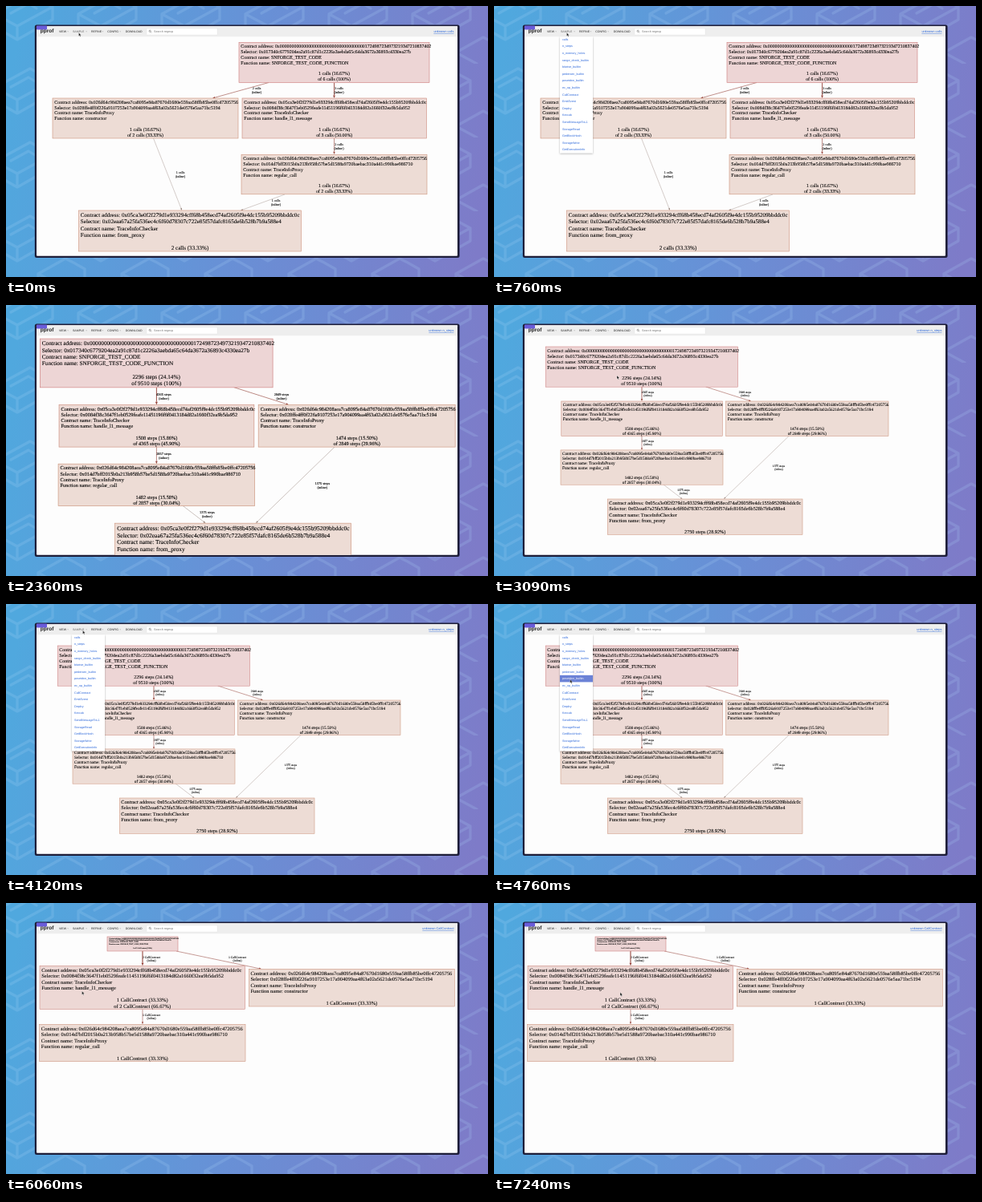
Animation of 600x338 px, one loop 7270 ms. Source, as an HTML page:

```html
<!DOCTYPE html>
<html lang="en">
<head>
<meta charset="utf-8">
<title>Call graph profile</title>
<style>
html, body { margin: 0; width: 100%; height: 100%; overflow: hidden; background: #6a8cd4; }
svg { display: block; width: 600px; height: 338px; text-rendering: geometricPrecision; }
text { white-space: pre; }
.graph { font-family: "Liberation Serif", "Times New Roman", serif; }
.graph text { stroke: #000; stroke-width: .08px; }
.ui { font-family: "Liberation Sans", Arial, sans-serif; font-size: 3.7px; fill: #212121; }
.link { fill: #2a66d9; }
</style>
</head>
<body>
<svg id="stage" viewBox="0 0 600 338">
  <defs>
    <linearGradient id="sky" gradientUnits="userSpaceOnUse" x1="0" y1="120" x2="600" y2="220">
      <stop offset="0" stop-color="#50a8de"/>
      <stop offset=".5" stop-color="#6890d6"/>
      <stop offset="1" stop-color="#7e7bc8"/>
    </linearGradient>
    <pattern id="bricks" width="104" height="92" patternUnits="userSpaceOnUse" patternTransform="translate(-22 -20)">
      <g fill="none" stroke="#b4d8fa" stroke-opacity=".18" stroke-width="3.2" stroke-linejoin="round" stroke-linecap="round">
        <path d="M8 30 L52 6 L80 21 V37 L36 62 L8 46Z M8 30 L36 45 L80 21 M36 45 V62 M28 29 L50 17 L60 23"/>
        <path d="M62 78 L96 59 L104 63 M0 63 L16 72 V88 M62 78 V92 M62 78 L88 92"/>
      </g>
    </pattern>
    <clipPath id="page"><rect x="38" y="38" width="524" height="273.7"/></clipPath>
    <filter id="soft" x="-20%" y="-20%" width="140%" height="140%">
      <feDropShadow dx="0" dy="1" stdDeviation="1" flood-opacity=".3"/>
    </filter>
  </defs>
  <rect width="600" height="338" fill="url(#sky)"/>
  <rect width="600" height="338" fill="url(#bricks)"/>
  <rect x="35.8" y="23.5" width="528.8" height="290.5" rx="2.5" fill="#1d1d38"/>
  <rect x="38" y="25.3" width="524" height="286.4" rx="1" fill="#fdfdfd"/>
  <g id="graphs" class="graph" clip-path="url(#page)"></g>
  <g id="bar" class="ui"><rect x="38" y="25.3" width="524" height="13" fill="#eee"/></g>
  <g id="menu" class="ui"></g>
  <path id="cursor" d="M0 0 V4.3 L1 3.4 L1.7 5 L2.5 4.6 L1.8 3.1 H3.1Z" fill="#111" stroke="#fff" stroke-width=".35"/>
</svg>
<script>
const LOOP = 7270;
const $ = id => document.getElementById(id);

function add(parent, tag, attrs, content) {
  const el = document.createElementNS('http://www.w3.org/2000/svg', tag);
  for (const k in attrs) el.setAttribute(k, attrs[k]);
  if (content) el.textContent = content;
  parent.appendChild(el);
  return el;
}

// Redder for a larger share of the total
function heat(share, sat, value) {
  const v = value * 255;
  return `rgb(${v | 0},${v * (1 - sat * share ** 0.3) | 0},${v * (1 - sat) | 0})`;
}

const CHECKER = ['0x05ca3e0f2f279d1e933294cff68b458ecd74af2605f9e4dc155b95209bbddc0c', 'TraceInfoChecker'];
const PROXY = ['0x026d64c984208aea7ca8095e84a87670d1680e559aa58ffb85be0ffc47205756', 'TraceInfoProxy'];
const TEST = ['0x' + '0'.repeat(36) + '1724987234973219347210837402', 'SNFORGE_TEST_CODE'];
const FUNCS = {
  test: [TEST, '0x017340c6779204ea2a91c87d1c2226a3aebda65c64da3672a36893c4330ea27b', 'SNFORGE_TEST_CODE_FUNCTION'],
  init: [PROXY, '0x028ffe4ff0f226a9107253e17a904099aa4f63a02a5621de0576e5aa71bc5194', 'constructor'],
  handle: [CHECKER, '0x0084f38c3647f1eb0529feafe11451196f6f0413184d82a1660f32ea9b5da952', 'handle_l1_message'],
  regular: [PROXY, '0x014d7bff2015b0a213b958b57be5d1588a9720baebac310a441c990bae986710', 'regular_call'],
  from: [CHECKER, '0x02eaa67a25fa536ec4c6f60d78307c722e85f57dafc8165de6b528b7b9a588e4', 'from_proxy']
};

// node: func, x, y, w, h, font size in points, share, totals
// edge: x1, y1, x2, y2, pen, label, label x, label y
const GRAPHS = [
  { unit: 'calls', scale: .295,
    nodes: [
      ['test', 290, 45.5, 237, 50, 20, 1, '1 calls (16.67%)', 'of 6 calls (100%)'],
      ['init', 58, 115, 231, 50, 20, .333, '1 calls (16.67%)', 'of 2 calls (33.33%)'],
      ['handle', 294, 115, 229.5, 50, 20, .5, '1 calls (16.67%)', 'of 3 calls (50.00%)'],
      ['regular', 293, 185.3, 231, 49.5, 20, .333, '1 calls (16.67%)', 'of 2 calls (33.33%)'],
      ['from', 90.5, 255, 277, 51, 24, .333, '2 calls (33.33%)']],
    edges: [
      [327, 95.5, 257, 115, 2, '2 calls', 312, 103],
      [408.5, 95.5, 408.5, 115, 3, '3 calls', 414.5, 103],
      [408.5, 165, 408.5, 185, 2, '2 calls', 414.5, 173],
      [183.5, 165, 219, 255, 1, '1 calls', 217, 208],
      [347, 235, 292, 255, 1, '1 calls', 336, 243]] },
  { unit: 'n_steps', scale: .259,
    nodes: [
      ['test', 64.2, 52, 239.3, 50.2, 23, 1, '2296 steps (24.14%)', 'of 9510 steps (100%)'],
      ['handle', 83.8, 120, 200.5, 43.5, 20, .459, '1508 steps (15.86%)', 'of 4365 steps (45.90%)'],
      ['init', 288.7, 120, 202.3, 43.5, 20, .3, '1474 steps (15.50%)', 'of 2849 steps (29.96%)'],
      ['regular', 83, 180.9, 202, 43.3, 20, .3, '1482 steps (15.58%)', 'of 2857 steps (30.04%)'],
      ['from', 141.3, 242, 242.7, 44.3, 24, .289, '2750 steps (28.92%)']],
    edges: [
      [184, 102, 184, 120, 3, '4365 steps', 191.5, 109],
      [263.5, 102, 320, 120, 2, '2849 steps', 312.5, 109],
      [184, 163.5, 184, 181, 2, '2857 steps', 191.5, 170],
      [211, 224, 234.5, 242, 1, '1375 steps', 236, 231],
      [367, 163.5, 286, 242, 1, '1375 steps', 354.5, 201]] },
  { unit: 'CallContract', scale: .27,
    nodes: [
      ['test', 126, 42, 88, 18, 8, 1, '0 of 3 CallContract (100%)'],
      ['handle', 42, 78.3, 255.5, 54.2, 24, .667, '1 CallContract (33.33%)', 'of 2 CallContract (66.67%)'],
      ['init', 302.3, 82.3, 256, 46.7, 24, .333, '1 CallContract (33.33%)'],
      ['regular', 41.7, 151.3, 256.3, 46.4, 24, .333, '1 CallContract (33.33%)']],
    edges: [
      [170, 60, 170, 78.3, 4, '2 CallContract', 181, 67.5],
      [212, 60, 318, 82.3, 2, '1 CallContract', 288, 67.5],
      [170, 132.5, 170, 151.3, 2, '1 CallContract', 181, 139.8]] }
];

function drawNode(g, scale, [func, x, y, w, h, pt, share, ...totals]) {
  const [[address, contract], selector, name] = FUNCS[func];
  const size = pt * scale, pitch = size * 1.155;
  add(g, 'rect', { x, y, width: w, height: h, fill: heat(share, .1, .93), stroke: heat(share, .4, .8), 'stroke-width': scale * 2 });
  const line = (row, str, tx, anchor) =>
    add(g, 'text', { x: tx, y: y + size * 1.16 + row * pitch, 'font-size': size, 'text-anchor': anchor }, str);
  ['Contract address: ' + address, 'Selector: ' + selector, 'Contract name: ' + contract, 'Function name: ' + name]
    .forEach((str, i) => line(i, str, x + 8 * scale, 'start'));
  totals.forEach((str, i) => line(5 + i, str, x + w / 2, 'middle'));
}

function drawEdge(g, scale, [x1, y1, x2, y2, pen, label, lx, ly]) {
  const color = pen > 1 ? '#96453c' : '#9a8880';
  const len = Math.hypot(x2 - x1, y2 - y1), ux = (x2 - x1) / len, uy = (y2 - y1) / len;
  const head = (9 + pen) * scale, half = (3 + pen * .6) * scale;
  const bx = x2 - ux * head, by = y2 - uy * head;
  add(g, 'path', { d: `M${x1} ${y1}L${bx} ${by}`, stroke: color, 'stroke-width': Math.max(.42, pen * scale) });
  add(g, 'path', { d: `M${x2} ${y2}L${bx - uy * half} ${by + ux * half}L${bx + uy * half} ${by - ux * half}Z`, fill: color });
  [label, '(inline)'].forEach((str, i) =>
    add(g, 'text', { x: lx, y: ly + 1.3 + i * 16 * scale, 'font-size': 14 * scale, 'text-anchor': 'middle' }, str));
}

const views = GRAPHS.map(({ nodes, edges, scale }) => {
  const g = add($('graphs'), 'g', {});
  edges.forEach(e => drawEdge(g, scale, e));
  nodes.forEach(n => drawNode(g, scale, n));
  return g;
});

// Header
const bar = $('bar');
add(bar, 'rect', { x: 38, y: 24.5, width: 13, height: 5, rx: .8, fill: '#6a5cda' });
add(bar, 'text', { x: 42.8, y: 33.4, 'font-size': 6.5, 'font-weight': 700 }, 'pprof');
const names = [['VIEW', 66, 77], ['SAMPLE', 83, 100], ['REFINE', 106, 120.3], ['CONFIG', 126.3, 142], ['DOWNLOAD', 148.7, 0]]
  .map(([str, x, caret]) => {
    if (caret) add(bar, 'path', { d: `M${caret - .7} 31.6h1.6l-.8 .9z`, fill: '#999' });
    return add(bar, 'text', { x, y: 33.4, 'font-size': 3.55 }, str);
  });
add(bar, 'rect', { x: 175, y: 28, width: 88, height: 8, rx: .5, fill: '#fff', stroke: '#ddd', 'stroke-width': .3 });
add(bar, 'path', { d: 'M180 32.2l1.2 1.2M180.3 31.3a1.1 1.1 0 1 1-2.2 0a1.1 1.1 0 1 1 2.2 0', fill: 'none', stroke: '#555', 'stroke-width': .5 });
add(bar, 'text', { x: 184, y: 33.3, fill: '#757575' }, 'Search regexp');
const profile = add(bar, 'text', { x: 557.5, y: 33.4, 'font-size': 4, 'text-anchor': 'end', class: 'link', 'text-decoration': 'underline' }, ' ');

// Sample menu
const ROW = 8.6, MENU_TOP = 37.2;
const menu = $('menu');
add(menu, 'rect', { x: 82, y: 38.3, width: 41, height: 145, fill: '#fff', filter: 'url(#soft)' });
const rows = ('calls n_steps n_memory_holes range_check_builtin bitwise_builtin pedersen_builtin poseidon_builtin ' +
  'ec_op_builtin CallContract EmitEvent Deploy Keccak SendMessageToL1 StorageRead GetBlockHash StorageWrite GetExecutionInfo')
  .split(' ').map((str, i) => {
    const y = MENU_TOP + i * ROW;
    const back = add(menu, 'rect', { x: 82, y, width: 41, height: ROW, fill: '#6b82d6' });
    return { back, label: add(menu, 'text', { x: 85, y: y + 5.6, class: 'link' }, str) };
  });

const PATH = [
  [0, 90.5, 33.3], [850, 90.5, 33.3], [1350, 94.5, 48], [2380, 94.5, 48], [2620, 153, 88],
  [3250, 153, 88], [3800, 95.5, 33], [4300, 95.5, 33], [4950, 94.5, 110], [6150, 94.5, 110],
  [6700, 157, 111.5], [LOOP, 157, 111.5]
];
const OPEN = [[500, 1720], [3950, 5230]];
const SWITCH = [2020, 5750];
const HIDDEN = [2020, 2400];
const ZOOM = { from: 2560, to: 3020, start: 1.211, x: 168, y: 99 };

const ease = p => p * p * (3 - 2 * p);
const clamp = p => Math.min(1, Math.max(0, p));
const within = (t, [a, b]) => t >= a && t < b;
const show = (el, on) => el.style.display = on ? '' : 'none';

function cursorAt(t) {
  const i = Math.max(1, PATH.findIndex(p => p[0] > t));
  const [t0, x0, y0] = PATH[i - 1], [t1, x1, y1] = PATH[i];
  const p = ease(clamp((t - t0) / (t1 - t0)));
  return [x0 + (x1 - x0) * p, y0 + (y1 - y0) * p];
}

function draw(t) {
  const [x, y] = cursorAt(t);
  $('cursor').setAttribute('transform', `translate(${x} ${y})`);
  show($('cursor'), !within(t, HIDDEN));

  const current = SWITCH.filter(s => t >= s).length;
  views.forEach((g, i) => show(g, i === current));
  profile.textContent = 'unknown ' + GRAPHS[current].unit;

  const k = ZOOM.start + (1 - ZOOM.start) * ease(clamp((t - ZOOM.from) / (ZOOM.to - ZOOM.from)));
  views[1].setAttribute('transform', `translate(${ZOOM.x} ${ZOOM.y}) scale(${k}) translate(${-ZOOM.x} ${-ZOOM.y})`);

  show(menu, OPEN.some(span => within(t, span)));
  const hover = y > 38.3 ? Math.floor((y - MENU_TOP) / ROW) : -1;
  rows.forEach(({ back, label }, i) => {
    show(back, i === hover);
    label.style.fill = i === hover ? '#fff' : '';
  });
  names[1].style.opacity = y < 38.3 ? .7 : 1;
}

const begin = performance.now();
function tick() {
  draw((performance.now() - begin) % LOOP);
  requestAnimationFrame(tick);
}
tick();
</script>
</body>
</html>
```
